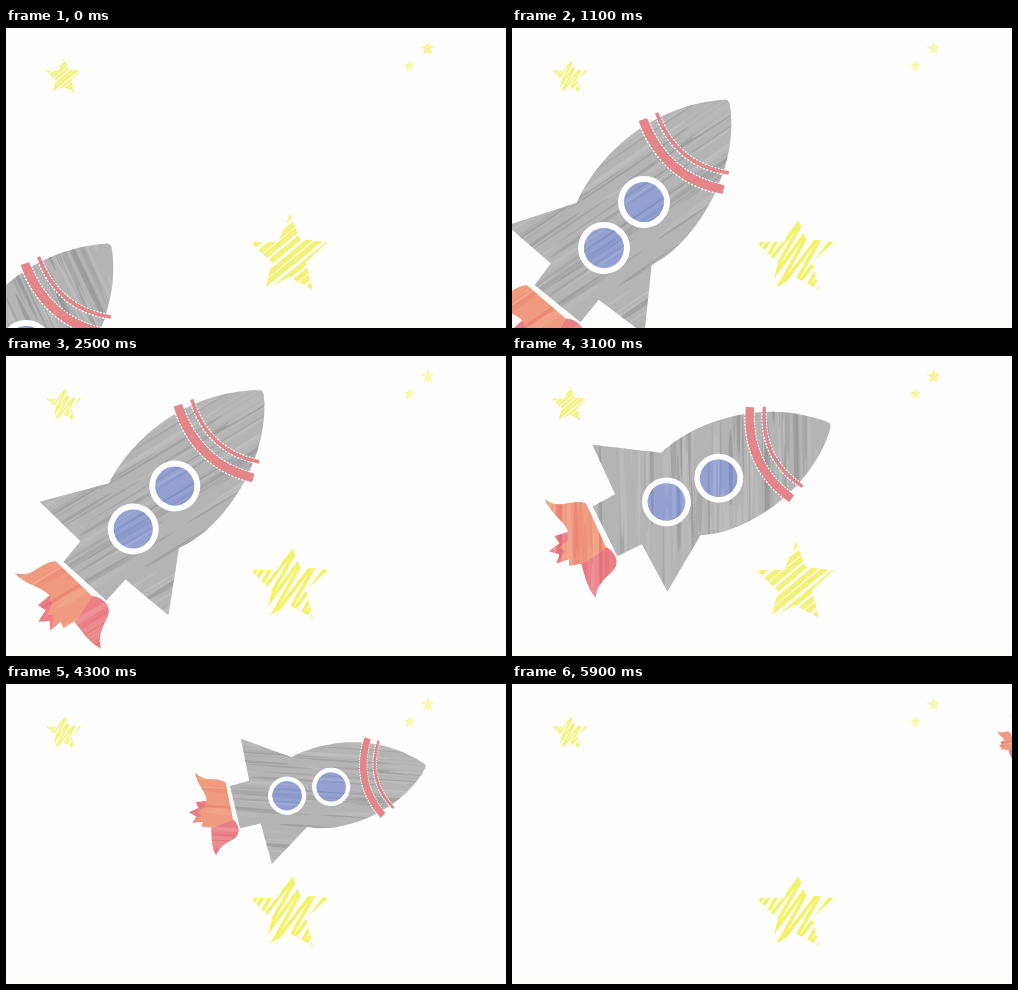
Write an HTML page with a canvas that moves like this. It is 500 px wide and 300 px high and loops after 6 s.

```html
<!DOCTYPE html>
<html>
<head>
<meta charset="utf-8">
<title>Rocket</title>
<style>
html, body { margin: 0; width: 100%; height: 100%; overflow: hidden; background: #fefefe; }
canvas { display: block; }
</style>
</head>
<body>
<canvas id="stage" width="500" height="300"></canvas>
<script>
const ctx = document.getElementById('stage').getContext('2d');
const RAD = Math.PI / 180;

// time (s), x, y, heading (degrees), scale
const KEYS = [
  [0, 0, 341, -49, 1],
  [0.4, 45, 289, -49, 1],
  [1.1, 112, 197, -49, 1],
  [1.9, 143, 142, -49, 1],
  [2.2, 136, 152, -49, 1],
  [2.5, 148, 151.5, -46, 0.98],
  [3.7, 225, 113, -7.5, 0.885],
  [4.9, 396, 101, -17.6, 0.542],
  [5.9, 529, 43, -26, 0.28]
];

const BODY = new Path2D(
  'M-14 -50 C25 -63 103 -64 161 -6 Q163 -3 161 0 C120 50 35 67 -12 47 ' +
  'L-69 87 L-73 30 L-102 31 L-104 -28 L-77 -30 L-77 -88 Z');
const WIDE_BAND = new Path2D('M92 -55 Q62 0 92 52');
const THIN_BAND = new Path2D('M106 -49 Q79 0 108 45');
const FLAME_RED = new Path2D(
  'M-109 17 C-100 28 -104 42 -115 44 C-128 48 -136 52 -141 61 C-146 48 -141 32 -140 20 Z ' +
  'M-136 -14 L-154 -16 L-152 -7 L-166 -4 L-157 4 L-164 11 L-136 14 Z');
const FLAME_ORANGE = new Path2D(
  'M-147 -56 C-138 -38 -122 -46 -109 -34 L-109 18 L-137 23 L-153 19 L-150 12 ' +
  'L-162 10 L-150 3 L-155 -3 L-143 -6 L-139 -14 C-137 -26 -148 -38 -147 -56 Z');

const STAR = new Path2D();
[[1, -42], [11, -17], [39, -14], [17, 6], [24, 34], [0, 21],
 [-24, 34], [-17, 7], [-39, -14], [-11, -14]].forEach(p => STAR.lineTo(...p));
STAR.closePath();

const STARS = [[283, 228, 1], [57.5, 49, 0.46], [421.5, 20.5, 0.18], [403.5, 38, 0.15]];
const GRAIN_ANGLES = [114, -20, 15];

function disc(x, r) {
  const path = new Path2D();
  path.arc(x, 0, r, 0, 7);
  return path;
}

function seeded(seed) {
  return () => (seed = (seed * 16807) % 2147483647) / 2147483647;
}

// Monotone cubic interpolation through the keys
function poseAt(t) {
  let i = 0;
  while (i < KEYS.length - 2 && t >= KEYS[i + 1][0]) i++;
  const a = KEYS[i], b = KEYS[i + 1], span = b[0] - a[0], f = (t - a[0]) / span;
  return [1, 2, 3, 4].map(c => {
    const slope = k => (KEYS[k + 1][c] - KEYS[k][c]) / (KEYS[k + 1][0] - KEYS[k][0]);
    const tangent = k => {
      if (k === 0) return slope(0);
      if (k === KEYS.length - 1) return slope(k - 1);
      const p = slope(k - 1), q = slope(k);
      return p * q <= 0 ? 0 : 2 * p * q / (p + q);
    };
    const g = 1 - f;
    return g * g * (1 + 2 * f) * a[c] + f * f * (3 - 2 * f) * b[c] +
      span * f * g * (g * tangent(i) - f * tangent(i + 1));
  });
}

// Crayon fill: flat colour with slanted strokes inside the shape
function crayon(path, base, dark, light, look) {
  const rnd = seeded(4217 + look * 991);
  ctx.save();
  ctx.fillStyle = base;
  ctx.fill(path);
  ctx.clip(path);
  ctx.rotate(GRAIN_ANGLES[look] * RAD);
  for (let i = 0; i < 240; i++) {
    ctx.fillStyle = i % 2 ? dark : light;
    ctx.globalAlpha = 0.3 + rnd() * 0.5;
    ctx.beginPath();
    ctx.ellipse((rnd() - 0.5) * 340, (rnd() - 0.5) * 340,
      30 + rnd() * 60, 0.6 + rnd() * rnd() * 4, 0, 0, 7);
    ctx.fill();
  }
  ctx.restore();
}

function band(path, width) {
  ctx.lineWidth = width + 2.5;
  ctx.strokeStyle = '#fff';
  ctx.setLineDash([2, 1.5]);
  ctx.stroke(path);
  ctx.setLineDash([]);
  ctx.lineWidth = width;
  ctx.strokeStyle = '#e58589';
  ctx.stroke(path);
}

function drawRocket(t, look) {
  const [x, y, heading, scale] = poseAt(t);
  ctx.save();
  ctx.translate(x, y);
  ctx.rotate(heading * RAD);
  ctx.scale(scale, scale);
  crayon(FLAME_RED, '#ea7f86', '#e06f78', '#f0989c', look);
  crayon(FLAME_ORANGE, '#f09b80', '#e88270', '#f5b094', look);
  crayon(BODY, '#b4b4b4', '#989898', '#c0c0c0', look);
  band(WIDE_BAND, 9);
  band(THIN_BAND, 3.5);
  for (const px of [-30.5, 30.5]) {
    ctx.fillStyle = '#fff';
    ctx.fill(disc(px, 26));
    crayon(disc(px, 20), '#94a1d0', '#7c8cc2', '#a6b2da', look);
  }
  ctx.restore();
}

function drawStar([x, y, scale], look) {
  const rnd = seeded(77);
  ctx.save();
  ctx.translate(x, y);
  ctx.scale(scale, scale);
  ctx.clip(STAR);
  ctx.lineJoin = 'round';
  ctx.beginPath();
  if (look === 0) {
    ctx.rotate(-38 * RAD);
    for (let v = -44; v < 46; v += 7.4) {
      ctx.moveTo(-50, v + rnd() * 2);
      ctx.lineTo(50, v - rnd() * 2);
    }
    ctx.lineWidth = 5.4;
    ctx.strokeStyle = '#f4f178';
  } else if (look === 1) {
    ctx.fillStyle = '#f1f47f';
    ctx.fill(STAR);
    ctx.rotate(-38 * RAD);
    for (let i = 0; i < 7; i++) {
      const u = rnd() * 40 - 35, v = i * 8 - 18;
      ctx.moveTo(u, v);
      ctx.lineTo(u + 28, v - 2);
    }
    ctx.lineWidth = 1.4;
    ctx.strokeStyle = '#fefefe';
  } else {
    ctx.rotate(-57 * RAD);
    for (let i = 0; i < 16; i++) {
      ctx.lineTo(i % 2 ? 45 : -45, i * 6 - 45 + rnd() * 2);
    }
    ctx.lineWidth = 3.6;
    ctx.strokeStyle = '#f3f268';
  }
  ctx.stroke();
  ctx.restore();
}

function draw(now) {
  let step = Math.floor(now % 6000 / 100);
  if (step === 5 || step === 54) step--; // two poses are held twice as long
  const look = Math.floor(step / 5) % 3;
  ctx.fillStyle = '#fefefe';
  ctx.fillRect(0, 0, 500, 300);
  ctx.fillStyle = '#fdfdfc';
  ctx.fillRect(0, 290, 500, 10);
  STARS.forEach(star => drawStar(star, look));
  drawRocket(step / 10, look);
}

let start;
function tick(now) {
  start ??= now;
  draw(now - start);
  requestAnimationFrame(tick);
}
requestAnimationFrame(tick);
</script>
</body>
</html>
```
